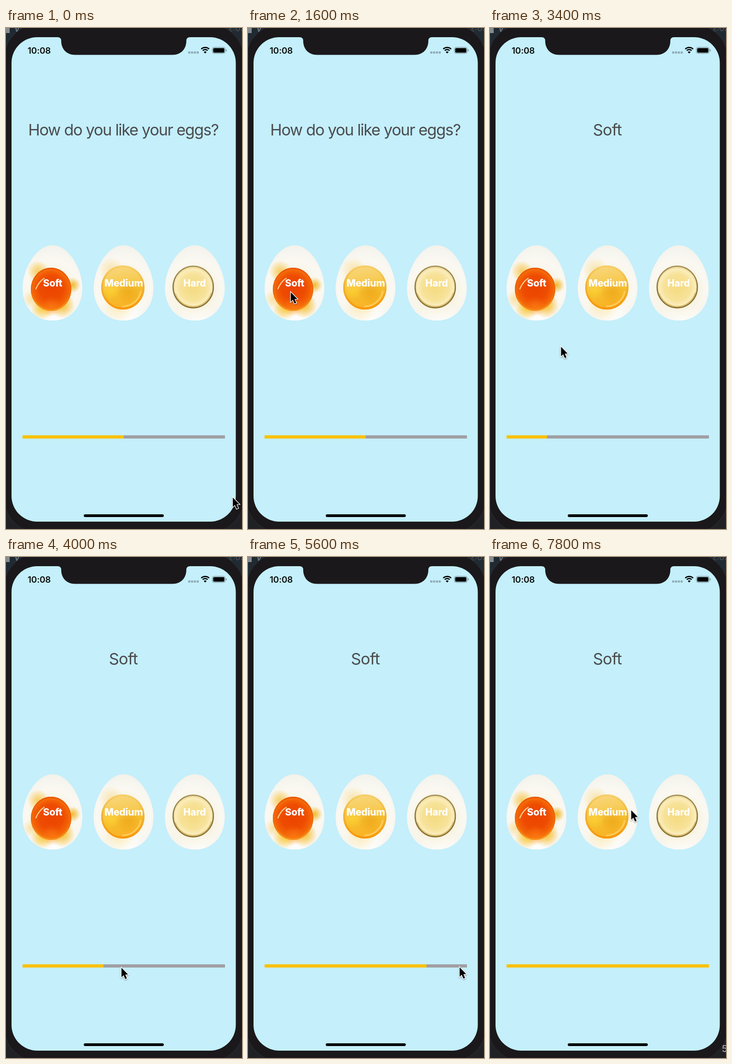
Animation, 513 px wide and 1091 px high, one loop 8 s. Source, as an HTML page with a canvas:

```html
<!DOCTYPE html>
<html lang="en">
<head>
<meta charset="utf-8">
<title>Egg timer</title>
<style>
html, body { margin: 0; width: 100%; height: 100%; overflow: hidden; background: #1a181b; }
canvas { display: block; width: 513px; height: 1091px; }
</style>
</head>
<body>
<canvas id="stage" width="513" height="1091"></canvas>
<script>
const ctx = document.getElementById('stage').getContext('2d');
const LOOP = 8000, STEP = 200, SELECT_AT = 1800, FIRST_TICK = 2600;
const FONT = 'Inter, "Liberation Sans", sans-serif';

// time, x, y of the pointer tip
const POINTER = [
  [0, 492, 1021], [400, 492, 1021], [1400, 92, 574], [1600, 92, 574],
  [2000, 101, 584], [3000, 101, 584], [4000, 250, 893], [4200, 250, 893],
  [5000, 459, 892], [5600, 459, 892], [6000, 466, 998], [7000, 466, 998],
  [7800, 306, 550]
];

function fillRect(x, y, w, h, r, color) {
  ctx.fillStyle = color;
  ctx.beginPath();
  ctx.roundRect(x, y, w, h, r);
  ctx.fill();
}

function text(str, x, y, size, weight, color, spacing = 0, align = 'center') {
  ctx.font = `${weight} ${size}px ${FONT}`;
  ctx.letterSpacing = spacing + 'px';
  ctx.textAlign = align;
  ctx.fillStyle = color;
  ctx.fillText(str, x, y);
}

function gradient(g, stops) {
  stops.forEach(([at, color]) => g.addColorStop(at, color));
  return g;
}

function ellipse(x, y, rx, ry) {
  ctx.beginPath();
  ctx.ellipse(x, y, rx, ry, 0, 0, Math.PI * 2);
}

function glow(x, y, r, rgb, alpha) {
  ctx.fillStyle = gradient(ctx.createRadialGradient(x, y, 0, x, y, r),
    [[0, `rgba(${rgb},${alpha})`], [0.5, `rgba(${rgb},${alpha * 0.55})`], [1, `rgba(${rgb},0)`]]);
  ellipse(x, y, r, r);
  ctx.fill();
}

function eggWhite(cx) {
  ctx.beginPath();
  ctx.moveTo(cx, 473);
  ctx.bezierCurveTo(cx + 37, 473, cx + 65, 528, cx + 65, 566);
  ctx.bezierCurveTo(cx + 65, 609, cx + 38, 637, cx, 637);
  ctx.bezierCurveTo(cx - 38, 637, cx - 65, 609, cx - 65, 566);
  ctx.bezierCurveTo(cx - 65, 528, cx - 37, 473, cx, 473);
  ctx.fillStyle = gradient(ctx.createRadialGradient(cx, 565, 25, cx, 560, 90),
    [[0, '#f8f4e4'], [0.5, '#faf8f1'], [0.75, '#f6f5ef'], [1, '#f3f1e9']]);
  ctx.fill();
  ctx.clip();
  glow(cx + 5, 638, 50, '255,255,255', 0.9);
}

function yolk(x, y, rx, ry, fill, rim, rimWidth) {
  ellipse(x, y, rx, ry);
  ctx.fillStyle = fill;
  ctx.fill();
  ellipse(x, y, rx - rimWidth / 2, ry - rimWidth / 2);
  ctx.strokeStyle = rim;
  ctx.lineWidth = rimWidth;
  ctx.stroke();
}

function softEgg() {
  eggWhite(101);
  glow(70, 530, 24, '246,190,50', 0.75);
  glow(145, 560, 17, '240,180,30', 0.9);
  glow(80, 609, 26, '250,195,40', 0.95);
  glow(122, 604, 28, '245,185,35', 0.95);
  glow(56, 590, 20, '248,210,110', 0.6);
  const body = gradient(ctx.createRadialGradient(98, 563, 6, 98, 569, 47),
    [[0, '#ec4500'], [0.5, '#ee4c02'], [0.78, '#f36106'], [1, '#f87d12']]);
  const rim = gradient(ctx.createLinearGradient(0, 522, 0, 616),
    [[0, '#e95808'], [0.6, '#f06a0a'], [1, '#f59a1c']]);
  yolk(98, 569, 44, 47, body, rim, 3);
  glow(99, 606, 22, '252,130,20', 0.55);
  ctx.strokeStyle = 'rgba(255,215,150,.9)';
  ctx.lineWidth = 2.5;
  ctx.lineCap = 'round';
  ctx.beginPath();
  ctx.moveTo(65, 568);
  ctx.quadraticCurveTo(71, 553, 83, 545);
  ctx.stroke();
}

function mediumEgg() {
  eggWhite(255.5);
  glow(229, 527, 28, '248,218,140', 0.65);
  glow(245, 606, 36, '250,225,150', 0.6);
  const body = gradient(ctx.createLinearGradient(245, 517, 262, 613),
    [[0, '#f8d77c'], [0.35, '#f7cb56'], [0.6, '#f5bd2c'], [1, '#fab025']]);
  const rim = gradient(ctx.createLinearGradient(0, 517, 0, 613),
    [[0, '#f6d06c'], [0.45, '#f1b437'], [0.8, '#f6a015'], [1, '#f99408']]);
  yolk(254, 565, 47, 48, body, rim, 4);
  glow(266, 575, 27, '235,161,22', 0.6);
  glow(228, 572, 20, '255,213,50', 0.65);
  ctx.strokeStyle = 'rgba(255,213,110,.75)';
  ctx.lineWidth = 3;
  ctx.beginPath();
  ctx.ellipse(254, 565, 40, 41, 0, 0.2, 1.6);
  ctx.stroke();
}

function hardEgg() {
  eggWhite(410.5);
  glow(408, 580, 62, '244,234,200', 0.7);
  const body = gradient(ctx.createRadialGradient(407, 566, 8, 407, 564, 46),
    [[0, '#f5dc86'], [0.55, '#f7e299'], [0.82, '#fbedbb'], [1, '#e5cc80']]);
  const rim = gradient(ctx.createLinearGradient(0, 518, 0, 610),
    [[0, '#a3905b'], [0.5, '#88733f'], [1, '#80692d']]);
  yolk(407, 564, 45, 46.5, body, rim, 2.5);
  ctx.strokeStyle = 'rgba(190,155,65,.5)';
  ctx.lineWidth = 3;
  ctx.beginPath();
  ctx.ellipse(407, 564, 41.5, 43, 0, 0.3, 2.8);
  ctx.stroke();
}

function egg(draw, label, x) {
  ctx.save();
  draw();
  ctx.restore();
  text(label, x, 563, 21, 800, '#fff', -0.2);
}

function phone(t) {
  ctx.fillStyle = '#202a32';
  ctx.fillRect(0, 0, 513, 1091);
  fillRect(0, 0, 8, 11, 0, '#858b8d');
  text('V', 18, 8, 17, 'italic 500', '#7d8b94', 0, 'left');
  text('2:05', 482, 7, 18, 400, '#53575b', 0, 'left');
  ctx.fillStyle = '#202124';
  ctx.fillRect(0, 1000, 513, 91);
  fillRect(-4, -8, 521, 1107, 75, '#1a181b');
  ctx.strokeStyle = '#29292c';
  ctx.lineWidth = 1.5;
  ctx.stroke();
  if (t >= 7600) text('5', 504, 1078, 20, 500, '#a9a9ab', 0, 'left');

  fillRect(12, 20, 487.5, 1055, 56, '#c4effb');
  ctx.fillStyle = '#1a181b';
  ctx.beginPath();
  ctx.moveTo(112, 19);
  ctx.lineTo(112, 20);
  ctx.quadraticCurveTo(120, 20, 120, 28);
  ctx.bezierCurveTo(120, 46, 132, 58.5, 150, 58.5);
  ctx.lineTo(362, 58.5);
  ctx.bezierCurveTo(380, 58.5, 392, 46, 392, 28);
  ctx.quadraticCurveTo(392, 20, 400, 20);
  ctx.lineTo(400, 19);
  ctx.fill();
  fillRect(169, 1059, 174, 6, 3, '#000');
}

function statusBar() {
  text('10:08', 47, 55.5, 19, 600, '#0b0d0e', -0.2, 'left');
  for (let i = 0; i < 4; i++) fillRect(396 + i * 6.1, 51, 4.7, 4.7, 1, '#91adb6');
  ctx.strokeStyle = '#000';
  ctx.lineCap = 'butt';
  ctx.lineWidth = 2.7;
  for (const r of [12.2, 7.6]) {
    ctx.beginPath();
    ctx.arc(433, 54.5, r, -Math.PI * 0.75, -Math.PI * 0.25);
    ctx.stroke();
  }
  ctx.fillStyle = '#000';
  ctx.beginPath();
  ctx.moveTo(433, 55.5);
  ctx.arc(433, 55.5, 4.5, -Math.PI * 0.75, -Math.PI * 0.25);
  ctx.fill();
  ctx.strokeStyle = '#6d858c';
  ctx.lineWidth = 1;
  ctx.beginPath();
  ctx.roundRect(448.5, 42, 28, 13.5, 4);
  ctx.stroke();
  fillRect(450.3, 43.8, 24.4, 9.9, 2.5, '#000');
  fillRect(478, 46.5, 1.5, 4.5, 1, '#6d858c');
}

function pointerAt(t) {
  const i = POINTER.findIndex(p => p[0] > t);
  if (i < 0) return POINTER[POINTER.length - 1].slice(1);
  const [t0, x0, y0] = POINTER[i - 1], [t1, x1, y1] = POINTER[i];
  const u = (t - t0) / (t1 - t0), k = u * u * (3 - 2 * u);
  return [x0 + (x1 - x0) * k, y0 + (y1 - y0) * k];
}

function pointer(x, y) {
  ctx.save();
  ctx.translate(x, y);
  ctx.beginPath();
  ctx.moveTo(1, 1.5);
  for (const [px, py] of [[1, 22], [5.6, 17.8], [9.2, 26], [12.8, 24.5], [9.2, 16.5], [15.2, 16]]) ctx.lineTo(px, py);
  ctx.closePath();
  ctx.shadowColor = 'rgba(0,0,0,.35)';
  ctx.shadowBlur = 3;
  ctx.shadowOffsetY = 1.5;
  ctx.strokeStyle = '#fff';
  ctx.lineWidth = 2.6;
  ctx.lineJoin = 'miter';
  ctx.stroke();
  ctx.shadowColor = 'transparent';
  ctx.fillStyle = '#000';
  ctx.fill();
  ctx.restore();
}

function progressAt(t) {
  if (t < SELECT_AT) return 0.5;
  const ticks = Math.floor((t - FIRST_TICK) / 1000) + 1;
  return Math.min(5, Math.max(0, ticks)) / 5;
}

function draw(t) {
  phone(t);
  statusBar();
  if (t < SELECT_AT) text('How do you like your eggs?', 255, 233.5, 34.5, 400, '#4b4c4f', -1.4);
  else text('Soft', 255, 233.5, 34.5, 400, '#4b4c4f', -0.8);
  egg(softEgg, 'Soft', 101.5);
  egg(mediumEgg, 'Medium', 256);
  egg(hardEgg, 'Hard', 410);
  fillRect(36, 887, 440, 7, 0, '#a19fa4');
  fillRect(36, 887, 440 * progressAt(t), 7, 0, '#fac108');
  pointer(...pointerAt(t));
}

function loop() {
  const t = performance.now() % LOOP;
  draw(Math.floor(t / STEP) * STEP);
  requestAnimationFrame(loop);
}
loop();
</script>
</body>
</html>
```
